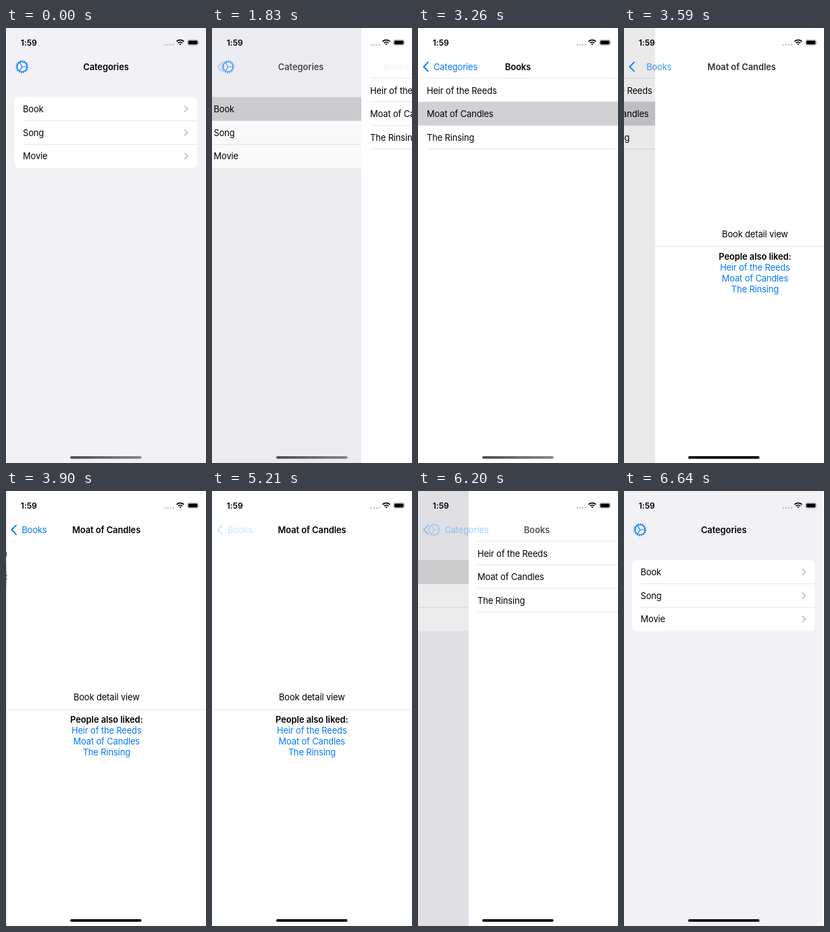
An HTML page that plays this animation: 296 by 640 pixels, repeating every 6.7 s.

```html
<!DOCTYPE html>
<html lang="en">
<head>
<meta charset="utf-8">
<title>Category navigation</title>
<style>
  html, body { margin: 0; width: 100%; height: 100%; overflow: hidden; background: #fff; }
  svg { display: block; width: 100vw; height: 100vh; }
  text { font: 400 12.9px Inter, "Liberation Sans", sans-serif; letter-spacing: -.12px; }
  .bold { font-weight: 600; letter-spacing: -.06px; }
  .mid { text-anchor: middle; }
  .blue { fill: #007aff; }
  .line { stroke: #dadade; stroke-width: .7; }
  .mark { fill: none; stroke-linecap: round; stroke-linejoin: round; }
</style>
</head>
<body>
<svg id="stage" viewBox="0 0 296 640" xmlns="http://www.w3.org/2000/svg">
  <defs>
    <clipPath id="cardShape"><rect x="12" y="101.5" width="271" height="104.5" rx="7.5"/></clipPath>
    <linearGradient id="barTone"><stop stop-color="#4c4c4c"/><stop offset="1" stop-color="#858585"/></linearGradient>
  </defs>
  <g id="pages"></g>
  <g id="bar">
    <g id="gear" class="mark" stroke="#007aff">
      <circle cx="23.7" cy="57" r="7.3" stroke-width="1.3"/>
      <circle cx="23.7" cy="57" r="8.6" stroke-width="1.7" stroke-linecap="butt" pathLength="32" stroke-dasharray="1 1"/>
      <path id="spokes" stroke-width="1.2"/>
    </g>
    <path id="chevron" class="mark" d="M15 50.4L8.4 57L15 63.6" stroke="#007aff" stroke-width="1.8"/>
  </g>
  <g id="status">
    <text class="bold" x="21.8" y="25.9" style="font-size:12.1px">1:59</text>
    <path d="M234.6 24.8h14" stroke="#b8b8ba" stroke-width="2" stroke-dasharray="2 2"/>
    <g id="wifi" fill="none" stroke="#000" stroke-width="1.8"></g>
    <rect x="268.6" y="17.4" width="16" height="7.9" rx="2.4" fill="none" stroke="#a6a6a6" stroke-width=".8"/>
    <rect x="269.7" y="18.5" width="13.8" height="5.7" rx="1.4"/>
    <path d="M285.7 20q1.5 1.4 0 2.8z" fill="#a6a6a6"/>
  </g>
  <rect id="home" x="95" y="629.9" width="105.6" height="3.9" rx="1.95"/>
</svg>
<script>
const LOOP = 6700, WIDTH = 296, PARALLAX = 0.3 * WIDTH, ROW = 34.7;
const OMEGA = 14.7, LEAD = 66;
const books = ["Heir of the Reeds", "Moat of Candles", "The Rinsing"];
const titles = ["Categories", "Books", books[1]];

// Each move between levels is shown in n steps after its first picture.
const moves = [
  { first: 1830, last: 2290, n: 6, from: 0, to: 1, settles: true },
  { first: 3430, last: 3900, n: 6, from: 1, to: 2 },
  { first: 5320, last: 5830, n: 7, from: 2, to: 1, settles: true },
  { first: 6200, last: 6640, n: 6, from: 1, to: 0 }
];
const backPresses = [[5210, 5320], [6120, 6200]];

const $ = id => document.getElementById(id);

function add(parent, tag, attrs, content = "") {
  const el = document.createElementNS("http://www.w3.org/2000/svg", tag);
  for (const key in attrs) el.setAttribute(key, attrs[key]);
  el.textContent = content;
  return parent.appendChild(el);
}
const label = (parent, content, x, y, cls = "") =>
  add(parent, "text", { x, y, class: cls }, content);
const rule = (parent, x1, x2, y) =>
  add(parent, "line", { x1, x2, y1: y, y2: y, class: "line" });
const box = (parent, x, y, width, height, fill) =>
  add(parent, "rect", { x, y, width, height, fill });

function makePage(fill, draw) {
  const group = add($("pages"), "g", {});
  box(group, 0, 0, WIDTH, 640, fill);
  const highlight = draw(group);
  const dim = box(group, 0, 0, WIDTH, 640, "#000");
  return { group, highlight, dim };
}

const pages = [
  makePage("#f2f2f6", g => {
    const card = add(g, "g", { "clip-path": "url(#cardShape)" });
    box(card, 12, 101, 271, 106, "#fff");
    const highlight = box(card, 12, 101, 271, 35.4, "#d1d1d5");
    ["Book", "Song", "Movie"].forEach((name, i) => {
      const y = 119 + i * ROW;
      label(card, name, 25, y + 5);
      add(card, "path", {
        class: "mark", d: `M264.6 ${y - 4.2}l4.4 4.2l-4.4 4.2`,
        stroke: "#bcbcc0", "stroke-width": 1.5
      });
      if (i) rule(card, 25, 283, y - 17.2);
    });
    return highlight;
  }),
  makePage("#fff", g => {
    for (let i = 0; i < 4; i++) rule(g, 13, WIDTH, 74 + i * ROW);
    const highlight = box(g, 0, 108.7, WIDTH, ROW, "#d1d1d5");
    books.forEach((name, i) => label(g, name, 13, 96.7 + i * ROW));
    return highlight;
  }),
  makePage("#fff", g => {
    label(g, "Book detail view", 147.8, 308.4, "mid");
    rule(g, 0, WIDTH, 321.3);
    label(g, "People also liked:", 147.8, 340.9, "mid bold");
    books.forEach((name, i) => label(g, name, 147.8, 357 + i * 16, "mid blue"));
  })
];

const titleLabels = titles.map(name => label($("bar"), name, 148, 61.8, "mid bold"));
const backLabels = titles.slice(0, 2).map(name => label($("bar"), name, 23, 61.8, "blue"));

const polar = (cx, cy, r, degrees) => {
  const a = degrees * Math.PI / 180;
  return `${cx + r * Math.cos(a)} ${cy + r * Math.sin(a)}`;
};
$("spokes").setAttribute("d",
  [0, 120, 240].map(a => `M23.7 57L${polar(23.7, 57, 7, a)}`).join(""));
[1.2, 4.5, 7.6].forEach(r => add($("wifi"), "path", {
  d: `M${polar(257.9, 25.3, r, -135)}A${r} ${r} 0 0 1 ${polar(257.9, 25.3, r, -45)}`,
  "stroke-width": r < 2 ? 2.4 : 1.8
}));

const spring = ms => {
  const x = OMEGA * ms / 1000;
  return 1 - (1 + x) * Math.exp(-x);
};

function navigation(t) {
  let depth = 0, pushing = true;
  for (const m of moves) {
    if (t < m.first) break;
    const offset = k => 10 * Math.round(k * (m.last - m.first) / m.n / 10);
    let k = m.n;
    while (k && m.first + offset(k) > t) k--;
    const p = k === m.n && m.settles ? 1 : spring(offset(k) + LEAD);
    depth = m.from + (m.to - m.from) * p;
    pushing = m.to > m.from;
  }
  const pressed = backPresses.some(([a, b]) => t >= a && t < b);
  return { depth: pressed ? Math.round(depth) : depth, pushing, pressed };
}

const clamp = v => Math.max(0, Math.min(1, v));
const fadeIn = (p, start = 0.3) => clamp((p - start) / (1 - start));
const fadeOut = p => clamp(1 - 1.3 * p);
const fade = (el, opacity) => el.setAttribute("opacity", opacity);

function render(t) {
  const { depth, pushing, pressed } = navigation(t);

  pages.forEach(({ group, highlight, dim }, i) => {
    const entered = clamp(depth - i + 1), covered = clamp(depth - i);
    const x = WIDTH * (1 - entered) - PARALLAX * covered;
    group.setAttribute("transform", `translate(${x})`);
    group.setAttribute("visibility", entered > 0 && covered < 1 ? "visible" : "hidden");
    fade(dim, 0.1 * covered);
    if (highlight) fade(highlight, t < [1830, 3260][i] ? 0 : pushing ? 1 : covered);
  });

  titleLabels.forEach((el, i) => {
    const s = depth - i, away = Math.abs(s);
    const leaving = pushing ? s > 0 : s < 0;
    const travel = s > 0 ? 65 : pushing ? 168 : 110;
    el.setAttribute("x", 148 - travel * s);
    fade(el, leaving ? fadeOut(away) : fadeIn(1 - away, pushing ? 0.22 : 0.3));
  });

  backLabels.forEach((el, i) => {
    const s = depth - i - 1, shown = 1 - Math.abs(s);
    el.setAttribute("x", 23 - (s < 0 ? 65 : 40) * s);
    const leaving = pushing ? s > 0 : s < 0;
    const opacity = !leaving ? fadeIn(shown) : pushing ? fadeOut(s) : 0.5 * shown;
    fade(el, clamp(opacity) * (pressed ? 0.2 : 1));
  });

  fade($("gear"), clamp(1 - depth));
  fade($("chevron"), clamp(depth) * (pressed ? 0.2 : !pushing && depth < 1 ? 0.5 : 1));
  $("home").setAttribute("fill", t < 3430 ? "url(#barTone)" : "#000");
}

const begin = performance.now();
function tick() {
  render((performance.now() - begin) % LOOP);
  requestAnimationFrame(tick);
}
tick();
</script>
</body>
</html>
```
